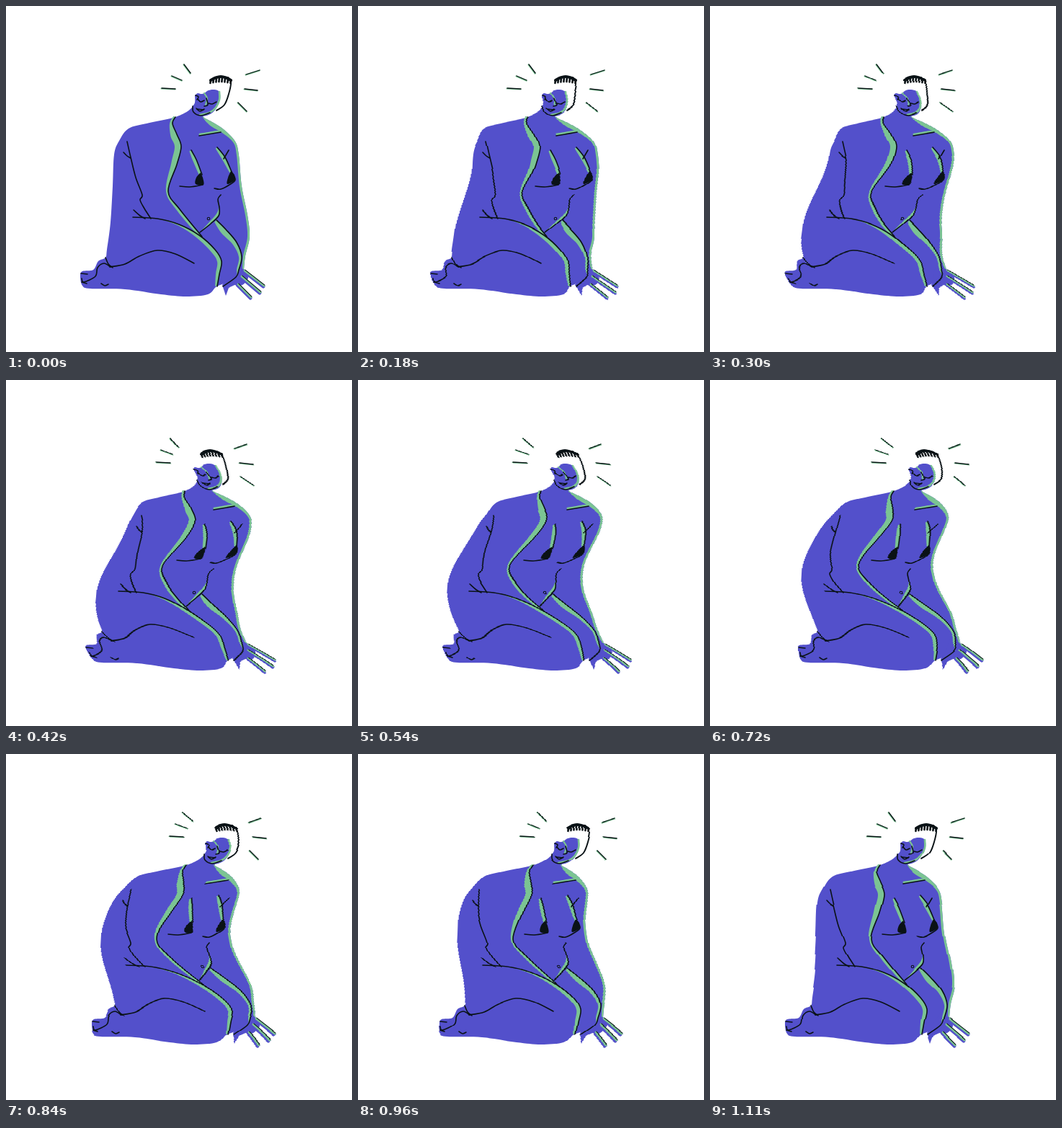
An HTML page with a canvas for the animation above (1140 ms loop, 480 by 480 pixels).

```html
<!DOCTYPE html>
<html lang="en">
<head>
<meta charset="utf-8">
<title>Swaying figure</title>
<style>
  html, body { margin: 0; width: 100%; height: 100%; overflow: hidden; background: #fff; }
  canvas { display: block; width: 100%; height: 100%; }
</style>
</head>
<body>
<canvas id="stage" width="480" height="480"></canvas>
<script>
const SIZE = 480, LOOP = 1140, STEP = 30;
const SKIN = '#5350cb', GLOW = '#7bc493', INK = '#0a1216';

// The figure is drawn once, as it stands at time 0; a wave then sways its rows.
const still = document.createElement('canvas');
still.width = still.height = SIZE;
const pen = still.getContext('2d');
pen.lineCap = pen.lineJoin = 'round';

const points = text => text.split(' ').map(p => p.split(',').map(Number));

// Smooth curve through the points, continuing the current path if asked.
function curve(p, join) {
  pen[join ? 'lineTo' : 'moveTo'](...p[0]);
  for (let i = 0; i < p.length - 1; i++) {
    const a = p[i - 1] || p[i], b = p[i], c = p[i + 1], d = p[i + 2] || c;
    pen.bezierCurveTo(b[0] + (c[0] - a[0]) / 6, b[1] + (c[1] - a[1]) / 6,
                      c[0] - (d[0] - b[0]) / 6, c[1] - (d[1] - b[1]) / 6, c[0], c[1]);
  }
}

function fill(color, ...parts) {
  pen.beginPath();
  parts.forEach((p, i) => curve(p, i > 0));
  pen.closePath();
  pen.fillStyle = color;
  pen.fill();
}

function stroke(p, color = INK, width = 1.6) {
  pen.beginPath();
  curve(p);
  pen.strokeStyle = color;
  pen.lineWidth = width;
  pen.stroke();
}

const inkLines = (...texts) => texts.forEach(t => stroke(points(t)));

// Glow strip beside a line, with its width given at each point.
function strip(p, widths) {
  const inner = p.map(([x, y], i) => {
    const a = p[i - 1] || p[i], b = p[i + 1] || p[i];
    const dx = b[0] - a[0], dy = b[1] - a[1], n = widths[i] / Math.hypot(dx, dy);
    return [x - dy * n, y + dx * n];
  });
  fill(GLOW, p, inner.reverse());
}

function band(text, widths) {
  const p = points(text);
  strip(p, widths);
  stroke(p);
}

function drawBody() {
  const back = points('262,136 252,146 232,155 195,163 170,170 157,187 150,206 148,250 145,300 140,338 138,349 128,354 121,366 106,368 103,375 106,388 117,392 165,393 215,400 250,403 280,400 291,390 300,386');
  const front = points('275,147 274,154 288,162 303,172 318,188 323,207 327,250 335,290 338,320 332,347 330,366');
  fill(SKIN, back, front.slice().reverse());
  strip(front, [0, 1, 6, 5, 3, 3, 3, 3, 3, 3, 2]);
}

function drawHand() {
  fill(SKIN, points('318,358 330,366 336,377 328,387 318,387 309,391'), points('305,402 300,387'));
  for (const [x, y, tipX, tipY] of [[331, 367, 358, 388], [327, 375, 353, 397], [322, 386, 340, 404]]) {
    const finger = [[x, y], [tipX, tipY]];
    stroke(finger.map(([u, v]) => [u - 1, v + 1]), SKIN, 5);
    stroke(finger, GLOW, 3);
    stroke(finger.map(([u, v]) => [u + .8, v - .9]), INK, 1.1);
  }
}

function drawTorso() {
  // chest strap and forearm, thigh, inner arm, belly, collarbone
  band('235,154 231,163 237,178 243,195 237,220 225,257 241,282 272,320', [3, 4, 9, 9, 8, 3, 4, 3]);
  band('176,293 210,295 240,303 268,318 290,338 299,354 296,372 293,389', [0, 0, 2, 5, 6, 6, 5, 3]);
  band('292,297 305,310 320,328 327,348 323,366 319,376 301,389', [4, 8, 6, 4, 3, 0, 0]);
  band('298,262 294,268 296,280 295,291 284,302 269,314', [0, 0, 1, 4, 3, 0]);
  band('268,180 298,175', [-3, -3]);

  band('257,200 264,213 272,234', [3, 5, 4]);
  band('293,196 304,210 313,230', [3, 5, 3]);
  fill(INK, points('270,231 264,238 263,247 274,248 273,238'));
  fill(INK, points('312,229 308,238 307,247 317,242 317,234'));
  inkLines('241,250 255,251 273,248', '289,253 298,254 310,248 318,241 313,230',
           '309,200 302,212');

  // far arm and hip
  inkLines('168,188 173,210 180,238 189,262 186,269 192,281 201,295',
           '163,203 168,208 173,211', '177,283 186,291 193,295');
  pen.beginPath();
  pen.arc(281, 295, 1.8, 0, 2 * Math.PI);
  pen.lineWidth = 1.1;
  pen.stroke();
}

function drawLeg() {
  inkLines('144,362 165,358 185,347 210,339 235,344 261,357',
           '138,349 142,358 148,363',
           '145,362 136,357 127,363 124,375 108,383 105,378',
           '132,385 137,388 142,386', '104,371 113,372', '105,383 112,385');
}

function drawHead() {
  fill(SKIN, points('262,124 266,121 271,122 275,121 281,117 289,116 296,119 297,129 293,140 285,149 273,153 262,150 258,142 262,134 262,124'));
  stroke(points('296,119 296,130 291,141 282,148 269,151'), GLOW, 2.6);
  stroke(points('275,121 279,128 277,137'), GLOW, 2.2);
  inkLines('263,124 267,126 265,130', '266,129 270,133 275,131', '281,135 286,136 292,133',
           '278,128 280,137 275,139', '264,142 269,146 275,143', '265,143 274,144',
           '259,139 260,147 270,152 283,148');
}

function drawHair() {
  const tuft = t => [284 + 28 * t, 103 - 5 * Math.sin(Math.PI * t)];
  for (let i = 0; i <= 7; i++) {
    const [x, y] = tuft(i / 7);
    stroke([[x, y], [x - .6, y + 4 + 3 * Math.sin(Math.PI * i / 7)]], INK, 2.6);
  }
  stroke([0, .25, .5, .75, 1].map(tuft), INK, 4);
  stroke(points('308,99 312,106 309,122 303,137 292,145'), INK, 1.9);
}

function drawRays() {
  for (const text of ['247,81 256,93', '230,97 244,103', '216,114 235,115',
                      '333,95 352,89', '331,115 349,117', '322,134 334,146']) {
    const ray = points(text);
    stroke(ray.map(([x, y]) => [x - .4, y + .5]), GLOW, 2.2);
    stroke(ray, INK, 1.3);
  }
}

drawBody();
drawHand();
drawTorso();
drawLeg();
drawHead();
drawHair();
drawRays();

// Travelling sine wave: reach in px, one full turn every 230 px of height.
const REACH = 11, WAVE = 230, SHIFT = 7.784;
const sway = (y, t) => REACH * Math.cos(2 * Math.PI * (t / LOOP + y / WAVE) - SHIFT);

const ctx = document.getElementById('stage').getContext('2d');

function draw(ms) {
  const t = Math.floor((ms % LOOP) / STEP) * STEP;
  ctx.clearRect(0, 0, SIZE, SIZE);
  for (let y = 0; y < SIZE; y++) {
    const dx = Math.round(sway(y, t) - sway(y, 0));
    ctx.drawImage(still, 0, y, SIZE, 1, dx, y, SIZE, 1);
  }
}

const start = performance.now();
function tick() {
  draw(performance.now() - start);
  requestAnimationFrame(tick);
}
tick();
</script>
</body>
</html>
```
